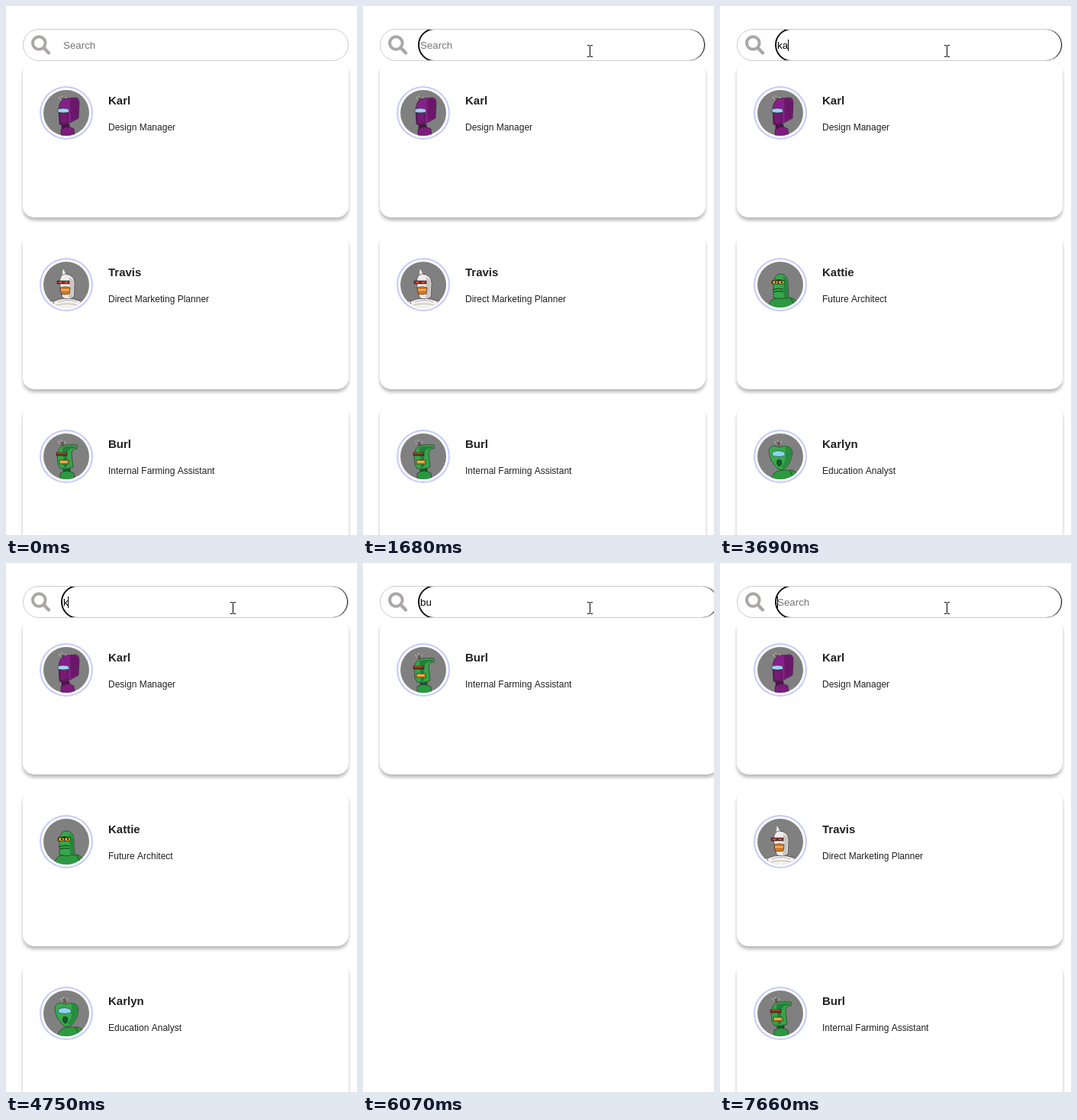
Write an HTML page with a canvas that moves like this. It is 460 px wide and 693 px high and loops after 8 s.

```html
<!DOCTYPE html>
<html lang="en">
<head>
<meta charset="utf-8">
<title>Team search</title>
<style>
html, body { margin: 0; width: 100%; height: 100%; overflow: hidden; background: #fff; }
canvas { display: block; }
</style>
</head>
<body>
<canvas id="stage" width="460" height="693"></canvas>
<script>
const ctx = document.getElementById('stage').getContext('2d');
const LOOP = 8000;
const SANS = '"Liberation Sans", Arial, sans-serif';
const LEFT = 22, PITCH = 225;

// start time, query, caret visible
const states = [
  [1140, '', true], [1680, '', false], [2220, '', true],
  [2340, 'ka', true], [2610, 'kar', true], [3160, 'kar', false],
  [3620, 'ka', false], [3690, 'ka', true], [4090, 'k', true],
  [4220, 'k', false], [4750, 'k', true], [4880, '', true],
  [5280, '', false], [5340, 'b', true], [5540, 'bu', true],
  [6070, 'bu', false], [6340, 'b', false], [6600, 'b', true],
  [6800, '', true], [7130, '', false], [7660, '', true]
];

function roundRect(x, y, w, h, r) {
  ctx.beginPath();
  ctx.roundRect(x, y, w, h, r);
}

function text(str, x, y, font, color) {
  ctx.font = `${font} ${SANS}`;
  ctx.fillStyle = color;
  ctx.fillText(str, x, y);
}

function shape(d, fill, line = 'rgba(30,20,30,.65)', width = 0.8) {
  const path = new Path2D(d);
  if (fill) { ctx.fillStyle = fill; ctx.fill(path); }
  if (line) { ctx.strokeStyle = line; ctx.lineWidth = width; ctx.stroke(path); }
}

function tuft(x, y) {
  shape(`M${x} ${y}l-6-6M${x} ${y}l-2-8M${x} ${y}l4-6`, null, '#b0a29c', 1.5);
  shape(`M${x - 2} ${y}l-1-5l5 0l0 6z`, '#665b59', null);
}

function eyes(x1, x2, y) {
  for (const x of [x1, x2]) {
    shape(`M${x - 4} ${y - 2}h7v4h-7z`, '#e9b51e');
    shape(`M${x - 1} ${y - 1}h2v2h-2z`, '#241a10', null);
  }
}

// Robot portraits, centred on 0,0 and clipped to a disc of radius 30
const robots = {
  Karl() {
    tuft(-4, -15);
    shape('M-6 15h10v7h-10z', '#4b174c');
    shape('M-7 22q8-7 17-1l1 10h-18z', '#7d1c7c');
    shape('M-10-5q1-13 11-14l12-1q4 1 4 8l-1 19q-9 5-15 8q-5 2-10 0z', '#85208a');
    shape('M5-18q8-3 11 3l0 21l-10 5z', '#6b1769', null);
    shape('M-9 0l11-1l0 14q-6 3-10 1z', '#741b72');
    shape('M-11-5q7-2 14 0l1 4q-8 2-15 0z', '#9bd5ef');
  },
  Travis() {
    shape('M-32 32q0-9 10-10l13-2h24l13 3q7 2 8 9z', '#e2dfdc');
    shape('M-17 22q17-8 36 0l-2 9h-32z', '#f3f1ef');
    shape('M-11 23q14-5 24 0M-13 27q14-4 28 0', null, '#aaa49f');
    shape('M-5-13l1-7l3 6z', '#fff', '#ddd');
    shape('M-9-3q1-11 8-11q11 1 12 12l-1 18q-8 5-15 1z', '#eeecea');
    shape('M4-10q7 4 6 11l-2 16l-5 2z', '#cbc6c2', null);
    shape('M-12-5h16v4h-16z', '#70322b');
    shape('M-10-4h4v2h-4zM-2-4h4v2h-4z', '#ed4a31', null);
    shape('M-8 4q7-3 13 0l-1 8q-6 2-11 0z', '#d77a22');
    shape('M-7 7h11', null, '#fff0c0', 1);
  },
  Burl() {
    tuft(-5, -14);
    shape('M-4 15h9v7h-9z', '#185f28');
    shape('M-8 22q9-6 18 0l1 10h-19z', '#2b9840');
    shape('M-12-2q1-9 7-12q7-2 19-1l0 5q-7-1-7 7l2 17q-8 4-17 2l-3-5z', '#35a548');
    shape('M-5-12q8-2 17-1l0 2q-9-1-11 8l0 17l-4 1z', '#238039', null);
    shape('M-13-5h14v4h-14z', '#6f2a1a');
    shape('M-12-4h12', null, '#d76033', 1);
    shape('M-9 5h12v5h-12z', '#d58a23');
    shape('M-8 7h9', null, '#ffe18a', 1);
  },
  Kattie() {
    shape('M-16 32q1-14 11-14l18-1q11 2 13 15z', '#2d9940');
    shape('M13 17l9 15', null, '#17612a', 1.2);
    shape('M-9-2q1-12 9-12q10 0 10 13l1 18q-11 3-20 0z', '#35a84a');
    shape('M4-11q5 4 5 11l1 16l-5 1z', '#24863b', null);
    shape('M-11-5q10-3 16 0l-1 4h-15z', '#303126');
    eyes(-6, 2, -3);
    shape('M-10 7q7-3 14-1M-9 10q6-2 13-1', null, '#174e20', 1.3);
  },
  Karlyn() {
    tuft(-2, -14);
    shape('M-12 32q1-12 13-14h13q11 2 12 14z', '#2c9b3f');
    shape('M12 18l7 14', null, '#17612a', 1.2);
    shape('M-2-12q-10-5-13 4q0 11 7 19q5 8 12 6q10-5 12-22q-1-12-18-7z', '#36ab4b');
    shape('M6-13q10 0 9 10q-3 14-11 19l-2-3q8-9 4-26z', '#258d3d', null);
    shape('M-10-6q7-3 15 0l2 5q-9 3-18 0z', '#8ad5ee');
    shape('M-4 5q5-2 6 2q0 6-4 6q-4-3-2-8z', '#145f28');
  },
  Brady() {
    shape('M-23 32q2-10 13-12l17-1q13 2 18 13z', '#a8a4a4');
    shape('M-9 32a11 9 0 0 1 20 0z', '#ddb545');
    shape('M-15 24q15-7 31 1', null, '#d6d2d0', 2);
    shape('M-8-12l3-4l3 4z', '#a62a30');
    shape('M-11-2q1-11 9-12q9 1 9 13l1 17q-9 4-17 0z', '#b2afaf');
    shape('M2-11q4 5 4 12l0 15l-4 2z', '#8a8586', null);
    shape('M-12-6h14q2 2 0 5h-13z', '#5e1820');
    shape('M-8-4h7', null, '#b03437', 1);
    shape('M-8 4h12v7q-6 3-11 0z', '#dfb548');
    shape('M-7 7h10M-4 4v8M0 4v8', null, '#795c28', 0.7);
  },
  Beau() {
    shape('M-22 32q4-14 14-17l17-1q13 2 17 18z', '#ec3f9d');
    shape('M-15 20l8 12M10 15q8 6 10 17', null, '#942462', 1.1);
    shape('M-5-18h7l1 5h-9z', '#c52b79');
    shape('M-9-13q9-4 16 0l0 29q-9 4-16 0z', '#ec459f');
    shape('M2-13l5 1l0 27l-4 2z', '#c72d82', null);
    shape('M-11-6h17v5h-17z', '#3d2023');
    eyes(-6, 2, -3);
    shape('M-4 5h5v6h-5z', '#e17b43');
  }
};

const people = [
  ['Karl', 'Design Manager'],
  ['Travis', 'Direct Marketing Planner'],
  ['Burl', 'Internal Farming Assistant'],
  ['Kattie', 'Future Architect'],
  ['Karlyn', 'Education Analyst'],
  ['Brady', 'Advertising Facilitator'],
  ['Beau', 'Consulting Officer']
];

function disc(x, y, r, color) {
  ctx.beginPath();
  ctx.arc(x, y, r, 0, Math.PI * 2);
  ctx.fillStyle = color;
  ctx.fill();
}

function drawCard([name, role], row, width) {
  const top = 72 + row * PITCH;
  ctx.save();
  ctx.shadowColor = 'rgba(0,0,0,.27)';
  ctx.shadowBlur = 4;
  ctx.shadowOffsetY = 4;
  ctx.fillStyle = '#fff';
  roundRect(LEFT, top, width, 205, 15);
  ctx.fill();
  ctx.restore();

  ctx.save();
  ctx.translate(79, top + 68);
  disc(0, 0, 35, '#c6cafa');
  disc(0, 0, 33, '#fff');
  disc(0, 0, 30, '#808080');
  ctx.clip();
  robots[name]();
  ctx.restore();

  text(name, 134, top + 57, 'bold 15px', '#212121');
  text(role, 134, top + 91, '12px', '#212121');
}

function drawSearch(width, focused, query, caret) {
  ctx.fillStyle = '#fff';
  roundRect(LEFT, 30, width, 42, 21);
  ctx.fill();
  roundRect(LEFT + 0.5, 30.5, width - 1, 41, 20.5);
  ctx.strokeStyle = '#ccc';
  ctx.lineWidth = 1;
  ctx.stroke();

  ctx.strokeStyle = '#aaa7a6';
  ctx.lineWidth = 4;
  ctx.beginPath();
  ctx.arc(43.3, 48.5, 8.3, 0, Math.PI * 2);
  ctx.stroke();
  ctx.lineCap = 'round';
  ctx.lineWidth = 4.4;
  ctx.beginPath();
  ctx.moveTo(49.8, 55);
  ctx.lineTo(56, 61.5);
  ctx.stroke();
  ctx.lineCap = 'butt';

  if (focused) {
    ctx.save();
    roundRect(LEFT + 1, 31, width - 2, 40, 20);
    ctx.clip();
    roundRect(73, 30, width - 52, 42, 21);
    ctx.strokeStyle = '#101010';
    ctx.lineWidth = 2;
    ctx.stroke();
    ctx.restore();
  }

  text(query || 'Search', 75, 56, '13.333px', query ? '#000' : '#757575');
  if (caret) {
    const x = Math.floor(75 + (query ? ctx.measureText(query).width : 0));
    ctx.fillStyle = '#000';
    ctx.fillRect(x, 44, 1, 15);
  }
}

function drawArrow(x, y) {
  ctx.save();
  ctx.translate(x, y);
  shape('M.5.5v16l3.7-3.6l2.4 5.6l2.6-1.1l-2.4-5.5h5z', '#fff', '#000', 1);
  ctx.restore();
}

function drawBeam(x, y) {
  ctx.fillStyle = '#000';
  ctx.fillRect(x, y - 7, 1, 14);
  for (const end of [-8, 7]) {
    ctx.fillRect(x - 3, y + end, 3, 1);
    ctx.fillRect(x + 1, y + end, 3, 1);
  }
}

function drawPointer(t) {
  if (t < 70) return;
  const p = Math.min(9, Math.floor((t - 70) / 67.7)) / 9;
  const ease = 1 - (1 - p) ** 2;
  const x = Math.round(427 - 130 * ease);
  const y = Math.round(680 - 621 * ease);
  if (t >= 1140 && t < 1340) disc(295, 58, 12, 'rgba(255,255,0,.47)');
  if (y < 72) drawBeam(x, y);
  else drawArrow(x, y);
}

function draw(t) {
  const state = states.findLast(s => s[0] <= t);
  const [, query, caret] = state || [0, '', false];
  const found = people.filter(([name]) => name.toLowerCase().startsWith(query));
  const width = found.length > 2 ? 427 : 444;

  ctx.fillStyle = '#fff';
  ctx.fillRect(0, 0, 460, 693);
  found.slice(0, 3).forEach((person, row) => drawCard(person, row, width));
  drawSearch(width, Boolean(state), query, caret);
  drawPointer(t);
}

const start = performance.now();
function tick() {
  draw((performance.now() - start) % LOOP);
  requestAnimationFrame(tick);
}
tick();
</script>
</body>
</html>
```
